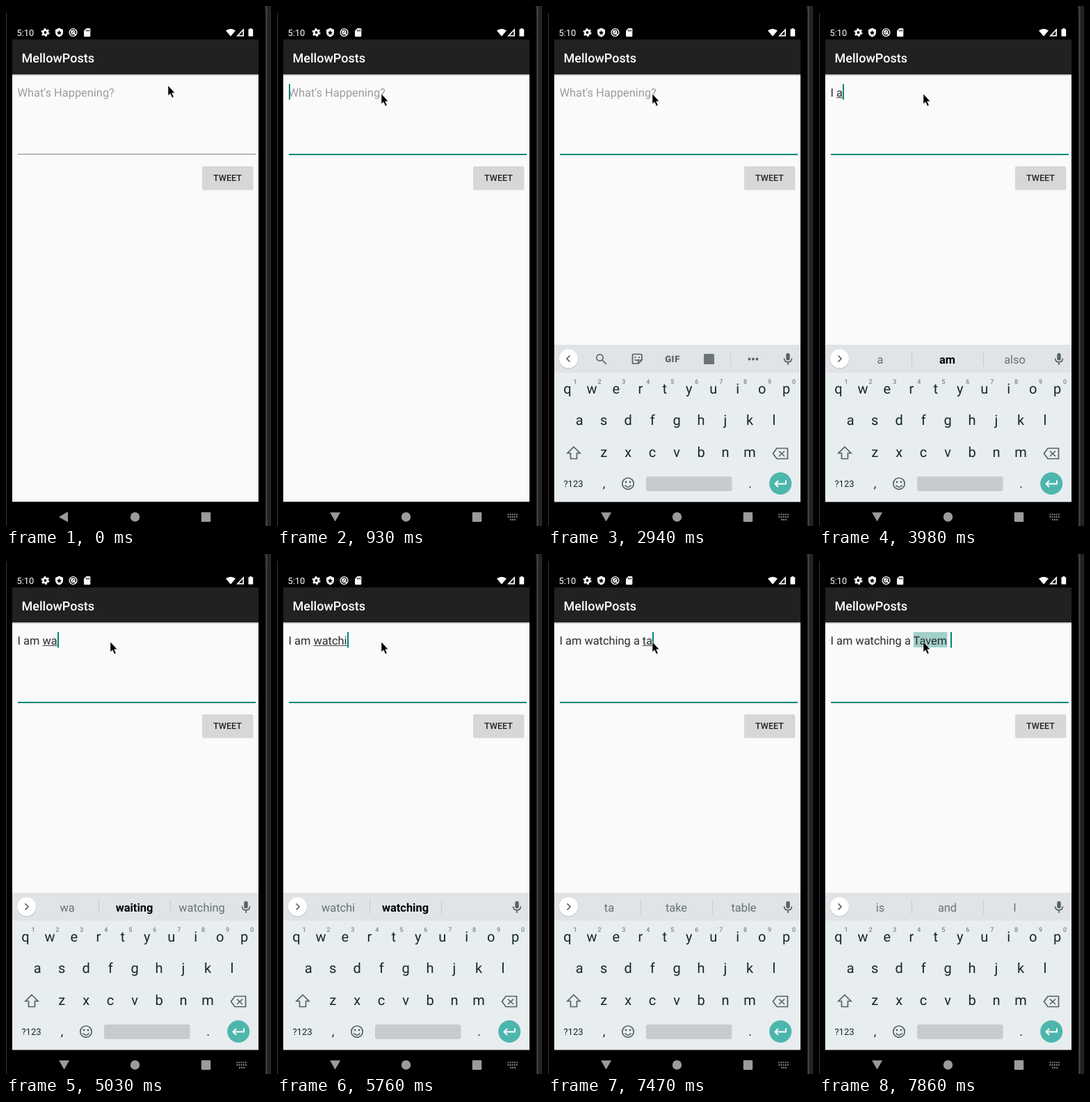
Recreate the animation shown at these times as an HTML page. Size 381 by 746 pixels, loop 8 s.

```html
<!DOCTYPE html>
<html lang="en">
<head>
<meta charset="utf-8">
<title>Compose screen</title>
<style>
html, body { margin: 0; width: 100%; height: 100%; overflow: hidden; background: #000; }
svg { display: block; font-family: Roboto, sans-serif; text-rendering: geometricPrecision; }
text { white-space: pre; }
.mid { text-anchor: middle; }
.icon { fill: none; stroke: #566168; stroke-width: 1.7; }
.hidden { display: none; }
</style>
</head>
<body>
<svg width="381" height="746" viewBox="0 0 381 746">
  <defs>
    <linearGradient id="edge">
      <stop offset="0" stop-color="#0a0a0b"/><stop offset=".35" stop-color="#444448"/>
      <stop offset=".6" stop-color="#1c1c1f"/><stop offset="1" stop-color="#2c2c30"/>
    </linearGradient>
    <linearGradient id="shade" x2="0" y2="1">
      <stop offset="0" stop-color="#000" stop-opacity=".35"/><stop offset="1" stop-color="#000" stop-opacity="0"/>
    </linearGradient>
  </defs>
  <rect width="381" height="746"/>
  <path d="M.5 10V746" stroke="#3a3a3c"/>
  <path d="M371 0H381V746H373V12Q373 5 371 0" fill="url(#edge)"/>

  <!-- status bar -->
  <g fill="#fff">
    <text x="15.5" y="42.5" font-size="12.8">5:10</text>
    <circle cx="56.5" cy="38" r="3.2" fill="none" stroke="#fff" stroke-width="2.6"/>
    <circle cx="56.5" cy="38" r="5" fill="none" stroke="#fff" stroke-width="2" stroke-dasharray="2.6 2.636"/>
    <path d="M76.5 31.5L82 34V38Q82 42.5 76.5 44.5Q71 42.5 71 38V34Z"/>
    <path d="M76.5 34.5L77.5 37 80 37.3 78.2 39 78.7 41.5 76.5 40.2 74.3 41.5 74.8 39 73 37.3 75.5 37Z" fill="#000"/>
    <g fill="none" stroke="#fff" stroke-width="1.4">
      <circle cx="96.5" cy="38" r="5.4"/><circle cx="96.3" cy="37.8" r="2.5"/><path d="M94 35.5L100.5 42"/>
    </g>
    <path d="M115.5 32H120Q121.3 32 121.3 33.2V43Q121.3 44 120 44H113.3Q112 44 112 43V35.5Z"/>
    <path d="M115.5 34V36.5M117.5 34V36.5M119.4 34V36.5" stroke="#000"/>
    <path d="M316 35.2Q323 30.2 330 35.2L323 43.5Z"/>
    <path d="M342 32V43.5H331Z"/><path d="M340.3 36V41.8H335Z" fill="#000"/>
    <path d="M348.5 33.3H350.3V32H353.3V33.3H355.2V43.5H348.5Z"/>
  </g>

  <!-- app -->
  <rect x="9" y="98" width="354" height="613.5" fill="#fafafa"/>
  <rect x="9" y="98" width="354" height="2.5" fill="url(#shade)"/>
  <rect x="9" y="48" width="354" height="50" fill="#212121"/>
  <text x="22.5" y="81" font-size="18" font-weight="500" fill="#fff">MellowPosts</text>
  <rect x="282" y="231" width="73.5" height="33.2" rx="2" fill="#000" opacity=".12"/>
  <rect x="282" y="230" width="73" height="33" rx="2" fill="#d6d7d7"/>
  <text class="mid" x="318.5" y="251.3" font-size="12.6" font-weight="500" fill="#222">TWEET</text>
  <rect id="fieldLine" x="17" y="212" width="342"/>
  <rect id="highlight" y="112" height="22" fill="#a1cfca"/>
  <text id="field" x="16.5" y="129.7" font-size="16.4"></text>
  <rect id="composing" y="131" height="1" fill="#444"/>
  <rect id="caret" y="112" width="2" height="22.5" fill="#008577"/>

  <!-- keyboard -->
  <g id="keyboard">
    <rect x="9" y="486" width="354" height="226" fill="#e8edf0"/>
    <rect x="9" y="486" width="354" height="40" fill="#e0e4e7"/>
    <circle cx="29.5" cy="507" r="13.8" fill="#000" opacity=".13"/>
    <circle cx="29.5" cy="506" r="13.5" fill="#fff"/>
    <path id="chevron" class="icon"/>
    <g id="tools">
      <circle class="icon" cx="74.5" cy="504.5" r="4.6"/><path class="icon" d="M78 508L84 514" stroke-width="2.2"/>
      <path class="icon" d="M123 499.5H133Q135 499.5 135 501.5V508L130 513H123Q121.5 513 121.5 511V501.5Q121.5 499.5 123 499.5ZM135 508H130V513M125 507Q127 510 130 507M125.5 503V505M131 503V505"/>
      <text class="mid" x="179" y="511" font-size="13" font-weight="900" letter-spacing=".6" fill="#566168">GIF</text>
      <rect x="224" y="499" width="15" height="15" rx="1.5" fill="#6b757a"/>
      <path d="M262.5 496V517" stroke="#cbd0d3"/>
      <g fill="#566168"><circle cx="289.5" cy="506.5" r="1.9"/><circle cx="295" cy="506.5" r="1.9"/><circle cx="300.5" cy="506.5" r="1.9"/></g>
    </g>
    <g id="words" font-size="16.4">
      <path id="dividers" d="M133.5 496V517M236.5 496V517" stroke="#c6cbce"/>
    </g>
    <rect x="342.3" y="498" width="5.4" height="10.5" rx="2.7" fill="#566168"/>
    <path class="icon" d="M339.5 505.5Q340 511 345 511Q350 511 350.5 505.5M345 511V515"/>
    <g id="keys" fill="#14272e"></g>
    <path class="icon" d="M37 632.5L46 641.5H41.5V649.5H32.5V641.5H28Z"/>
    <path class="icon" d="M329 634.5H344.5V649.5H329L323.5 642ZM332 638.5L340 646M340 638.5L332 646"/>
    <circle class="icon" cx="115" cy="685.2" r="8.2"/>
    <path class="icon" d="M110.5 687.5Q115 693 119.5 687.5"/>
    <g fill="#566168"><circle cx="112" cy="683" r="1.4"/><circle cx="118" cy="683" r="1.4"/></g>
    <rect x="141" y="675" width="123.5" height="21" rx="3" fill="#c6cbce"/>
    <circle cx="334.2" cy="685" r="16" fill="#4db6ac"/>
    <path d="M342 680.5V685.5H327M331 681L326.5 685.5L331 690" fill="none" stroke="#fff" stroke-width="1.9"/>
  </g>

  <!-- navigation bar -->
  <rect x="9" y="711.5" width="354" height="34.5"/>
  <g fill="#9b9b9b">
    <path id="back" d="M76 733L89 725.5V740.5Z"/>
    <circle cx="185.5" cy="733" r="6.7"/>
    <rect x="280.8" y="726.3" width="13.4" height="13.6" rx="1.2"/>
    <path id="switcher" d="M331.5 729.5H346M331.5 733H346M335 737H343" fill="none" stroke="#8c8c8c" stroke-width="1.8" stroke-dasharray="1.8 1.3"/>
  </g>
  <path id="mouse" d="M0 0V14.6L3.2 11.7 5.8 17.5 8.1 16.5 5.6 10.8H9.9Z" stroke="#fff" stroke-width=".5"/>
</svg>

<script>
const $ = id => document.getElementById(id);
const LEFT = 16.5, LOOP = 8000;
const ruler = document.createElement('canvas').getContext('2d');
ruler.font = '16.4px Roboto, sans-serif';
const widthOf = s => ruler.measureText(s).width;

function addText(parent, x, y, size, label, fill) {
  const el = document.createElementNS('http://www.w3.org/2000/svg', 'text');
  const attrs = { x, y, class: 'mid', 'font-size': size, ...(fill && { fill }) };
  for (const name in attrs) el.setAttribute(name, attrs[name]);
  el.textContent = label;
  parent.append(el);
  return el;
}

const keys = $('keys');
[['qwertyuiop', 28, 555.7], ['asdfghjkl', 45.3, 601.2], ['zxcvbnm', 80.2, 647]].forEach(([row, x, y], r) =>
  [...row].forEach((key, i) => {
    addText(keys, x + i * 34.95, y, 20, key);
    if (r === 0) addText(keys, x + i * 34.95 + 11, 542, 9, (i + 1) % 10, '#5d686e');
  }));
addText(keys, 36.5, 690, 13, '?123');
addText(keys, 80.5, 691, 18, ',');
addText(keys, 290.5, 691, 18, '.');
const slots = [88, 184.5, 281.5].map(x => addText($('words'), x, 513, 16.4, ''));

// time, committed text, word being composed, suggestions (* = bold)
const typing = [
  [3490, '', 'I', "I,*I'm,I'll"],
  [3610, 'I ', '', 'am,have,would'],
  [3980, 'I ', 'a', 'a,*am,also'],
  [4250, 'I ', 'am', 'an,*am,amazing'],
  [4500, 'I am ', '', 'not,so,going'],
  [4780, 'I am ', 'w', 'w,*with,want to'],
  [5030, 'I am ', 'wa', 'wa,*waiting,watching'],
  [5150, 'I am ', 'wat', 'wat,*watching,watched'],
  [5460, 'I am ', 'watc', 'watc,*watching,watched'],
  [5610, 'I am ', 'watch', 'watch,*watching,watches'],
  [5760, 'I am ', 'watchi', 'watchi,*watching,'],
  [5910, 'I am ', 'watchin', 'watchin,*watching,'],
  [6060, 'I am ', 'watching', ',watching,'],
  [6210, 'I am watching ', '', 'it,the,a'],
  [6740, 'I am watching ', 'a', 'a,and,all'],
  [6890, 'I am watching a ', '', 'video,lot,good'],
  [7350, 'I am watching a ', 't', 't,the,time'],
  [7470, 'I am watching a ', 'ta', 'ta,take,table'],
  [7620, 'I am watching a ', 'tav', 'tav,have,traveled'],
  [7740, 'I am watching a ', 'tavem', 'tavem,*Tavem,tavern'],
  [7860, 'I am watching a Tavem ', '', 'is,and,I']
];
const mouseSteps = [150, 270, 390, 510, 630, 780];
const caretToggles = [630, 1200, 1450, 2010, 2540, 2940, 3490];
const passed = (times, t) => times.filter(time => t >= time).length;
const show = (id, visible) => $(id).classList.toggle('hidden', !visible);

function set(id, attrs) {
  for (const name in attrs) $(id).setAttribute(name, attrs[name]);
}

function draw(t) {
  const p = passed(mouseSteps, t) / mouseSteps.length, ease = p * p * (3 - 2 * p);
  set('mouse', { transform: `translate(${233 - 83 * ease} ${114 + 12 * ease})` });

  const focused = t >= 630;
  set('fieldLine', { height: focused ? 2 : 1, fill: focused ? '#008577' : '#858585' });
  set('back', { transform: `rotate(${t < 780 ? 0 : t < 930 ? -45 : -90} 83 732.4)` });
  show('switcher', t >= 780);
  show('keyboard', t >= 1080);
  set('keyboard', { transform: `translate(0 ${t < 1200 ? 80 : 0})` });

  const [, done, word, hints] = typing.findLast(step => t >= step[0]) || [0, '', '', ''];
  const text = done + word;
  $('field').textContent = text || "What's Happening?";
  set('field', { fill: text ? '#2b2b2b' : '#9c9c9c' });
  set('composing', { x: LEFT + widthOf(done), width: widthOf(word) });
  set('caret', { x: Math.round(LEFT + widthOf(text)) });
  show('caret', passed(caretToggles, t) % 2);
  show('highlight', t >= 7860);
  set('highlight', { x: LEFT + widthOf('I am watching a '), width: widthOf('Tavem') });

  show('tools', !hints);
  show('words', hints);
  set('chevron', { d: hints ? 'M27.5 501.5L32 506L27.5 510.5' : 'M31.5 501.5L27 506L31.5 510.5' });
  const options = hints.split(',');
  show('dividers', options[0]);
  slots.forEach((slot, i) => {
    const option = options[i] || '', bold = option[0] === '*';
    slot.textContent = option.replace('*', '');
    slot.setAttribute('font-weight', bold ? 700 : 400);
    slot.setAttribute('fill', bold ? '#000' : '#667177');
  });
}

const start = performance.now();
function tick() {
  draw((performance.now() - start) % LOOP);
  requestAnimationFrame(tick);
}
tick();
</script>
</body>
</html>
```
